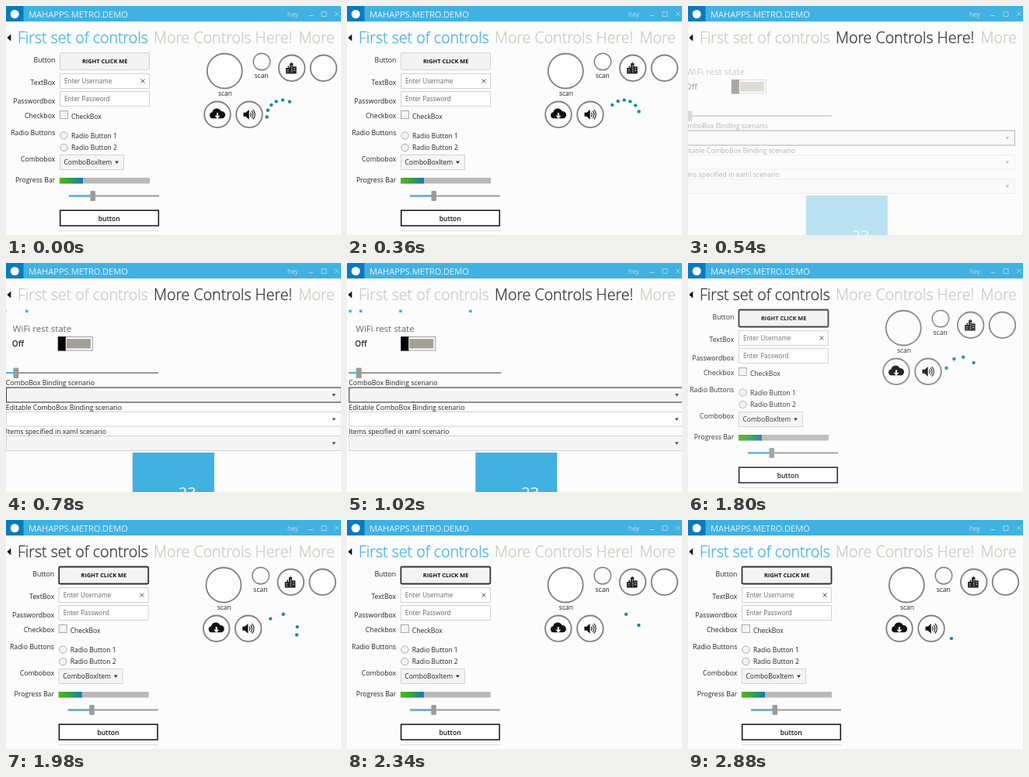
These frames come from a looping animation (431 by 296 pixels, 2940 ms). An HTML page:

```html
<!DOCTYPE html>
<html lang="en">
<head>
<meta charset="utf-8">
<title>Controls demo</title>
<style>
  html, body { margin: 0; width: 100%; height: 100%; overflow: hidden; background: #fcfcfc; }
  svg { display: block; width: 100vw; height: 100vh; }
  text { font: 8.5px "Open Sans", "Noto Sans", sans-serif; fill: #222; white-space: pre; }
  .tab { font-size: 19.6px; font-weight: 300; stroke-width: .3; }
  .label { font-size: 8.7px; text-anchor: end; }
  .caption { font-size: 8.7px; }
  .mid { text-anchor: middle; }
  .hint { font-size: 8.1px; fill: #666; }
  .bold { font-weight: 700; text-anchor: middle; fill: #111; }
  .field { fill: #fefefe; stroke: #d2d2d2; }
  .soft { fill: #f5f5f5; stroke: #d2d2d2; }
  .check { fill: #f3f3f3; stroke: #aaa; }
  .round { fill: #fdfdfd; stroke: #808080; stroke-width: 1.8; }
  .thumb { fill: #9b9b9b; }
  .accent { fill: #41b1e1; }
  .dot { fill: #168aa5; }
</style>
</head>
<body>
<svg viewBox="0 0 431 296" preserveAspectRatio="none">
  <defs>
    <linearGradient id="progress">
      <stop offset="0" stop-color="#4fb813"/>
      <stop offset=".5" stop-color="#35a04a"/>
      <stop offset="1" stop-color="#1479bd"/>
    </linearGradient>
  </defs>
  <rect width="431" height="296" fill="#fcfcfc"/>

  <g id="page1">
    <text class="label" x="63.3" y="73">Button</text>
    <text class="label" x="63.3" y="101.5">TextBox</text>
    <text class="label" x="63.3" y="126">Passwordbox</text>
    <text class="label" x="63.3" y="145">Checkbox</text>
    <text class="label" x="63.3" y="167">Radio Buttons</text>
    <text class="label" x="63.3" y="201">Combobox</text>
    <text class="label" x="63.3" y="228.3">Progress Bar</text>

    <rect id="mainButton" x="69.5" y="60.5" width="115" height="22" rx="1.5" fill="#f3f3f3"/>
    <text class="bold" x="127.2" y="74.3" style="font-size:7.4px">RIGHT CLICK ME</text>

    <rect class="field" x="69.5" y="87.5" width="115" height="19"/>
    <text class="hint" x="75" y="100">Enter Username</text>
    <path d="M173.5 94.5l5 5m0-5l-5 5" stroke="#555"/>
    <rect class="field" x="69.5" y="110.5" width="115" height="19"/>
    <text class="hint" x="75" y="123">Enter Password</text>

    <rect class="check" x="69.5" y="135.5" width="10" height="10"/>
    <text x="84" y="145.5">CheckBox</text>
    <circle class="check" cx="74.5" cy="167.5" r="4.7"/>
    <text x="84" y="170.5">Radio Button 1</text>
    <circle class="check" cx="74.5" cy="183" r="4.7"/>
    <text x="84" y="186">Radio Button 2</text>

    <rect class="soft" x="69.5" y="192.5" width="82" height="19"/>
    <text x="74.5" y="205">ComboBoxItem</text>
    <path d="M140 200.5h5l-2.5 3.5z" fill="#333"/>

    <rect x="69" y="222" width="116" height="7.5" fill="#b9b9b9"/>
    <rect x="69" y="222" width="30" height="7.5" fill="url(#progress)"/>

    <rect x="81" y="244.5" width="116" height="2" fill="#999"/>
    <rect class="accent" x="81" y="244.5" width="30" height="2"/>
    <rect class="thumb" x="108.5" y="239" width="6.5" height="13" rx="1"/>

    <rect x="69.7" y="264.2" width="126.6" height="19.8" fill="#fefefe" stroke="#111" stroke-width="1.5"/>
    <text class="bold" x="132.7" y="277.5" style="font-weight:600">button</text>
    <path d="M69 290.5h128" stroke="#ddd"/>

    <circle class="round" cx="281.3" cy="84" r="22.5"/>
    <text class="mid" x="282" y="116">scan</text>
    <circle class="round" cx="329" cy="72" r="10.8" style="stroke-width:1.4"/>
    <text class="mid" x="328.7" y="93">scan</text>

    <circle class="round" cx="367.7" cy="80.3" r="16.8"/>
    <g transform="translate(367.7 80.8) scale(.85)">
      <path d="M-9 8V-1h3v-3h2v3h1v-7h2v-2h1v2h2v5h5v11z" fill="#222"/>
      <path d="M-7 2h2m-2 3h2m4-9h2m-2 3h2m-2 3h2m-2 3h2m2-5h2m-2 3h2" stroke="#fff"/>
    </g>

    <circle class="round" cx="408.5" cy="80.3" r="16.8"/>

    <circle class="round" cx="272" cy="140.3" r="16.8"/>
    <g transform="translate(272 140.3) scale(.88)">
      <path d="M-7 5.7a4.7 4.7 0 0 1-.5-9.3 6.8 6.8 0 0 1 12.8-1.2 5.3 5.3 0 0 1 1.7 10.5z" fill="#111"/>
      <path d="M-1.2-2.3h2.4v4h2.8l-4 4.5-4-4.5h2.8z" fill="#fff"/>
    </g>

    <circle class="round" cx="313" cy="140.3" r="16.8"/>
    <g transform="translate(312.3 140.3) scale(.85)">
      <path d="M-8-3h3.5l5-4.5v15l-5-4.500H-8z" fill="#111"/>
      <path d="M2.500-3q2 3 0 6m2-8.500q4 5.500 0 11m2-13q6 7.500 0 15" fill="none" stroke="#222" stroke-width="1.3"/>
    </g>
    <g id="ring"></g>
  </g>

  <g id="page2">
    <g id="sweep"></g>
    <text x="12" y="89" style="font-size:11.5px;fill:#666">WiFi rest state</text>
    <text x="11" y="108" style="font-size:10px;font-weight:600">Off</text>
    <rect x="70.5" y="95.5" width="44" height="17.5" fill="#fefefe" stroke="#999"/>
    <rect x="81" y="98" width="31" height="12.5" fill="#a3a196"/>
    <rect x="70" y="95" width="10" height="18.5" fill="#050505"/>

    <rect x="3" y="141" width="196" height="2" fill="#999"/>
    <rect class="accent" x="3" y="141" width="11" height="2"/>
    <rect class="thumb" x="12.5" y="135.5" width="7" height="13.5" rx="1"/>

    <text class="caption" x="3" y="158">ComboBox Binding scenario</text>
    <rect class="soft" x="3.5" y="161" width="431" height="19" style="stroke:#222"/>
    <text class="caption" x="3" y="189.5">Editable ComboBox Binding scenario</text>
    <rect class="field" x="3.5" y="192.5" width="431" height="18.5"/>
    <text class="caption" x="3" y="221">Items specified in xaml scenario</text>
    <rect class="soft" x="3.5" y="223.5" width="431" height="19"/>
    <path d="M422.5 169h5l-2.5 3.5zm0 31.5h5l-2.5 3.5zm0 31h5l-2.5 3.5z" fill="#555"/>

    <rect class="accent" x="166" y="245" width="105" height="60"/>
    <text x="225" y="304" style="font-size:20px;fill:#fff">23</text>
  </g>

  <rect class="accent" width="431" height="20"/>
  <rect width="22.5" height="20" fill="#087bbd"/>
  <circle cx="11.2" cy="10.5" r="5.5" fill="#fff"/>
  <text x="29" y="14.5" style="font-size:11.1px;fill:#e6f5fb">MAHAPPS.METRO.DEMO</text>
  <text x="362" y="13.5" style="fill:#b9e1f3">hey</text>
  <path d="M389.5 12.5h5.5M406 7.5h6v6h-6zM423 7.5l5.5 5.5m0-5.5l-5.5 5.5" fill="none" stroke="#a9daf0"/>

  <path d="M6.3 36.5v9l-5-4.5z" fill="#111"/>
  <text id="tab1" class="tab" x="15" y="48">First set of controls</text>
  <text id="tab2" class="tab" x="190" y="48">More Controls Here!</text>
  <text id="tab3" class="tab" x="376.5" y="48">More</text>
</svg>

<script>
const LOOP = 2940, STEP = 60, HOLD = 180;
const TO_PAGE2 = 420, TO_PAGE1 = 1480, HOVER = 2040;
const GREY = "#c8c8c6", BLACK = "#333", BLUE = "#41b1e1";
const byId = id => document.getElementById(id);

// Ring angles in degrees clockwise from the top; a dot vanishes after its last key.
const START_ANGLES = [26, 0, -24, -46, -69, -94];
const KEY_TIMES = [1480, 1560, 1800, 2340, 2880, 2940];
const DOT_KEYS = [
  [12, 33, 225],
  [-24, -6, 225],
  [-50, -35, 50, 225],
  [-68, -55, 6, 225],
  [-92, -82, -28, 73, 225],
  [-112, -108, -72, 9, 237, 262]
];
const SWEEP_PHASES = [2, 4.2, 8.3, 12.6];

function addShapes(parent, count, tag, attributes) {
  return Array.from({ length: count }, () => {
    const shape = document.createElementNS("http://www.w3.org/2000/svg", tag);
    for (const [name, value] of Object.entries(attributes)) shape.setAttribute(name, value);
    return parent.appendChild(shape);
  });
}
const ringDots = addShapes(byId("ring"), 6, "circle", { class: "dot", r: 2.2 });
const sweepDots = addShapes(byId("sweep"), 4, "rect", { class: "accent", y: 60.5, width: 3.5, height: 3.5 });

function show(shape, visible) {
  shape.setAttribute("visibility", visible ? "inherit" : "hidden");
}

function colourTab(id, colour) {
  byId(id).style.fill = byId(id).style.stroke = colour;
}

function ringAngle(i, t) {
  if (t < TO_PAGE2) return START_ANGLES[i] + 0.2 * Math.max(0, t - 120);
  const keys = DOT_KEYS[i];
  const k = KEY_TIMES.findIndex((time, n) => n > 0 && t < time);
  if (k < 1 || k >= keys.length) return undefined;
  const part = (t - KEY_TIMES[k - 1]) / (KEY_TIMES[k] - KEY_TIMES[k - 1]);
  return keys[k - 1] + (keys[k] - keys[k - 1]) * part;
}

// Pages fade in while easing to rest from the left.
function enter(page, age) {
  page.setAttribute("opacity", Math.min(1, Math.max(0, age / 353)));
  page.setAttribute("transform", `translate(${-30 * Math.exp(-age / 160)} 0)`);
}

function draw(t) {
  const onPage2 = t >= TO_PAGE2 && t < TO_PAGE1;
  const returned = t >= TO_PAGE1;
  show(byId("page1"), !onPage2);
  show(byId("page2"), onPage2);
  enter(byId("page1"), returned ? t - TO_PAGE1 : LOOP);
  enter(byId("page2"), t - TO_PAGE2);

  colourTab("tab1", onPage2 ? GREY : returned && t < HOVER ? BLACK : BLUE);
  colourTab("tab2", onPage2 ? BLACK : GREY);
  colourTab("tab3", GREY);
  byId("mainButton").setAttribute("stroke", returned ? "#333" : "#d2d2d2");
  byId("mainButton").setAttribute("stroke-width", returned ? 1.8 : 1);

  ringDots.forEach((dot, i) => {
    const angle = onPage2 ? NaN : ringAngle(i, t);
    const visible = Number.isFinite(angle);
    show(dot, visible);
    if (!visible) return;
    const a = angle * Math.PI / 180;
    dot.setAttribute("cx", 356 + 20.4 * Math.sin(a));
    dot.setAttribute("cy", 142 - 20.4 * Math.cos(a));
  });

  sweepDots.forEach((dot, i) => {
    const phase = SWEEP_PHASES[i] + (t - 1020) * 0.03;
    show(dot, phase > 0);
    dot.setAttribute("x", phase * phase - 1);
  });
}

const startTime = performance.now();
function tick() {
  const elapsed = (performance.now() - startTime) % LOOP;
  draw(elapsed < HOLD ? 0 : Math.floor(elapsed / STEP) * STEP);
  requestAnimationFrame(tick);
}
tick();
</script>
</body>
</html>
```
